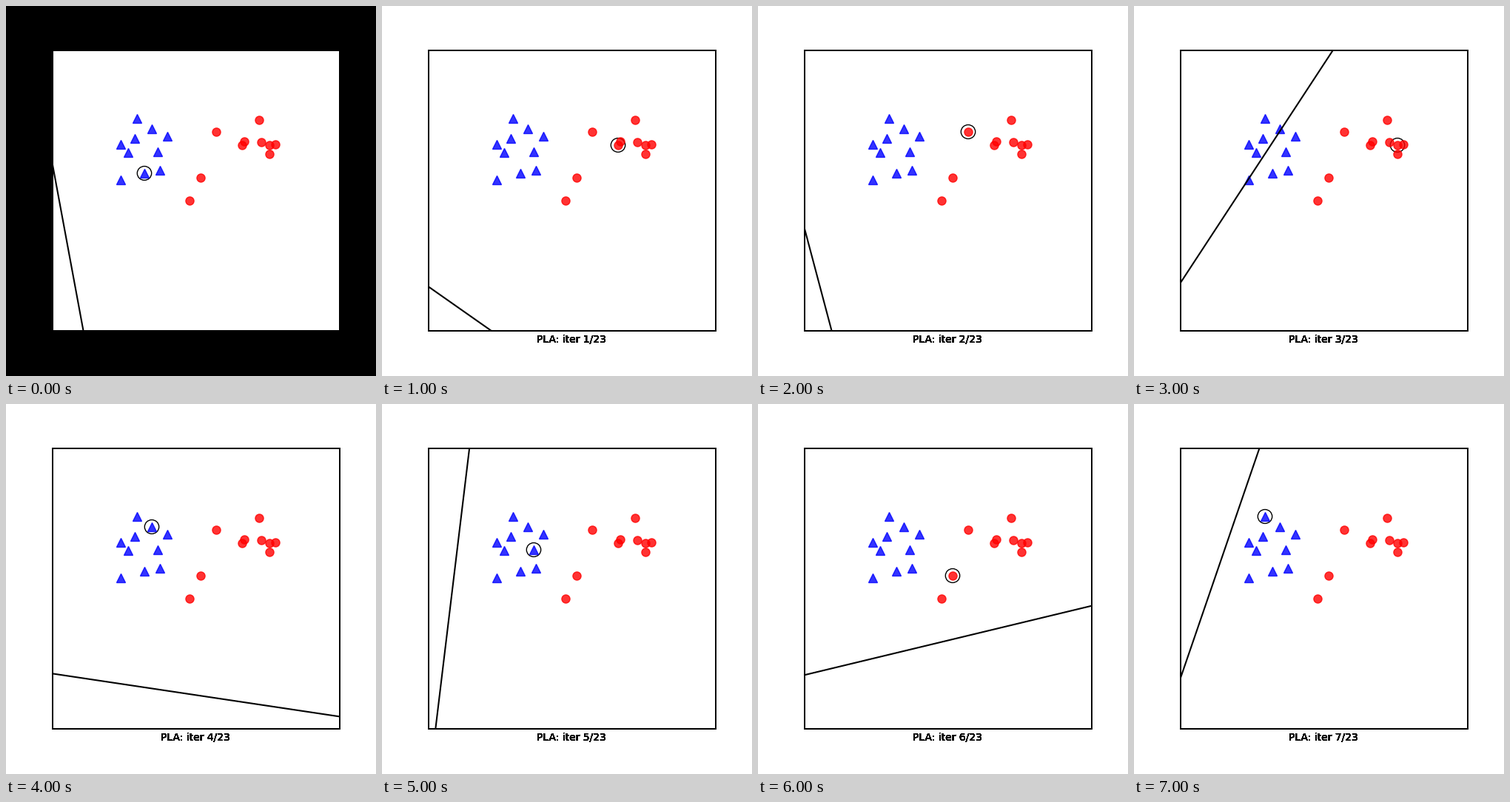
A matplotlib script that plays this animation: 500 px wide and 500 px high, repeating every 8000 ms.

```python
import matplotlib.pyplot as plt
import numpy as np
from matplotlib.animation import FuncAnimation
from matplotlib.patches import Ellipse, Rectangle

plt.rcParams["font.family"] = "DejaVu Sans"

SIZE = 500
LEFT, TOP, RIGHT, BOTTOM = 64, 61, 450, 438
UNIT = np.array([387.5, 377.5]) / 6     # pixels per data unit
ORIGIN = np.array([62.5, 60 + 4 * UNIT[1]])
FRAMES, TOTAL = 8, 23

# The two classes in pixels, in the order the learner visits them.
BLUE = [(155, 235), (174, 179), (208, 222), (218, 176), (187, 226),
        (197, 166), (205, 197), (177, 152), (155, 187), (165, 198)]
RED = [(345, 184), (284, 170), (263, 232), (319, 188), (356, 188),
       (342, 154), (322, 183), (364, 187), (356, 200), (248, 263)]
POINTS = np.array(BLUE + RED, float)
RINGED = [4, 13, 11, 14, 5, 6, 12, 7]
START = np.array([0.182, -0.637, -0.115])


def to_data(p):
    return (p - ORIGIN) / UNIT * (1, -1)


def to_pixels(p):
    return ORIGIN + p * (1, -1) * UNIT


def train(w, steps):
    """Perceptron: add the first fresh misclassified point at every step."""
    labels = np.repeat([1, -1], [len(BLUE), len(RED)])
    signed = labels[:, None] * np.column_stack(
        [np.ones(len(POINTS)), to_data(POINTS)])
    history = [w]
    fresh = list(signed)
    while len(history) < steps:
        k = next(j for j, s in enumerate(fresh) if s @ w < 0)
        w = w + fresh.pop(k)
        history.append(w)
    return history


def boundary_ends(w, reach=12):
    normal = w[1:] / np.hypot(*w[1:])
    foot = -w[0] / np.hypot(*w[1:]) * normal
    along = reach * np.array([-normal[1], normal[0]])
    return to_pixels(np.array([foot - along, foot + along])).T


WEIGHTS = train(START, FRAMES)

fig = plt.figure(figsize=(5, 5), dpi=100, facecolor="white")
ax = fig.add_axes([0, 0, 1, 1])
ax.set_xlim(0, SIZE)
ax.set_ylim(SIZE, 0)
ax.axis("off")


def box(margin, color, zorder):
    patch = Rectangle((LEFT - margin, TOP - margin),
                      RIGHT - LEFT + 2 * margin, BOTTOM - TOP + 2 * margin,
                      color=color, lw=0, antialiased=False, zorder=zorder)
    return ax.add_patch(patch)


backdrop = ax.add_patch(Rectangle((0, 0), SIZE, SIZE, lw=0, zorder=0))
box(2, "black", 0.2)
panel = box(0, "white", 0.4)

ring = ax.add_patch(Ellipse((0, 0), *(0.3 * UNIT), fill=False,
                            ec="black", lw=1, zorder=1))
ax.plot(*zip(*BLUE), "b^", markersize=8, alpha=0.8)
ax.plot(*zip(*RED), "ro", markersize=8, alpha=0.8)
boundary, = ax.plot([], [], "k", lw=1.5)
boundary.set_clip_path(panel)

# Stacked copies harden the soft edges of the letters.
captions = [ax.text(256.25, 455, "", ha="center", va="baseline", fontsize=10)
            for _ in range(14)]


def update(i):
    backdrop.set_facecolor("black" if i == 0 else "white")
    boundary.set_data(*boundary_ends(WEIGHTS[i]))
    ring.set_center(POINTS[RINGED[i]])
    for caption in captions:
        caption.set_text(f"PLA: iter {i}/{TOTAL}")
    return []


anim = FuncAnimation(fig, update, frames=FRAMES, interval=1000,
                     repeat=True, repeat_delay=0)
plt.show()
```
